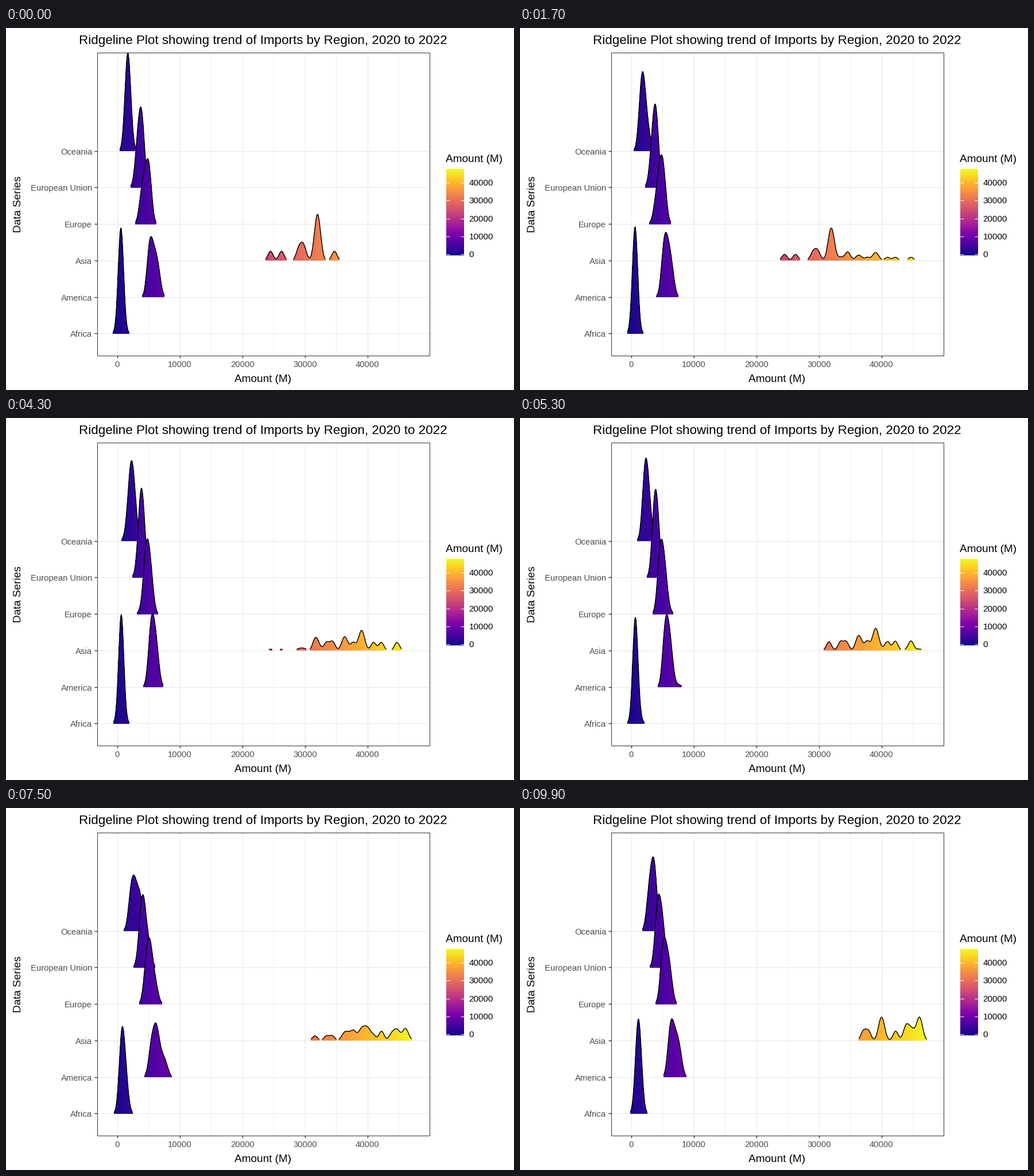
A matplotlib script for the animation above (10 s loop, 885 by 632 pixels).

```python
import numpy as np
import matplotlib.pyplot as plt
from matplotlib.animation import FuncAnimation
from matplotlib.collections import PolyCollection
from matplotlib.patches import Rectangle

W, H, DPI = 885, 632, 100
PX = 72 / DPI
FRAMES, MID = 100, 50
LEFT, RIGHT, TOP, BOTTOM = 159, 738, 43, 571.5
LOW, HIGH = -765, 47500      # range of the density grid and the colour scale
BASE, STEP = 533.4, 63.77    # lowest baseline, distance between ridges
BW, UNIT = 405, 16.2         # kernel width, pixel height of one month
CUT = 1.91                   # ridges lower than this are not drawn
THIN, LINE = 0.9, 1.4
GRID, TICK, GREY = "#EBEBEB", "#333333", "#4D4D4D"
CMAP = plt.get_cmap("plasma")

plt.rcParams["font.family"] = "Liberation Sans"


def cells(n):
    return (np.arange(n) + 0.5) / n


def run(dense, sparse):
    """Twelve months crowding at one end and thinning out to the other."""
    return dense + (sparse - dense) * cells(12) ** 1.5


def clusters(counts):
    """Groups of months spread evenly around centres given in thousands."""
    return np.concatenate([1000 * c + 900 * (cells(n) - 0.5)
                           for c, n in counts.items()])


# Monthly amounts of 2020, 2021 and 2022, lowest ridge first
DATA = {
    "Africa": [run(425, 860), run(565, 800), run(860, 1660)],
    "America": [run(4960, 6850), run(5240, 6560), run(6050, 8050)],
    "Asia": [
        clusters({24.5: 1, 26.25: 1, 28.95: 1, 29.7: 2, 32: 6, 34.7: 1}),
        clusters({31.6: 1, 33.45: 1, 34.35: 1, 36.35: 2, 37.7: 1, 39.05: 3,
                  40.95: 1, 42.2: 1, 44.7: 1}),
        clusters({37.1: 1, 37.9: 1, 40: 3, 42.25: 1, 44: 2, 44.9: 1,
                  46.05: 3})],
    "Europe": [run(5310, 3630), run(4400, 5700), run(4870, 6500)],
    "European Union": [run(4170, 2980), run(3560, 4460), run(4000, 5400)],
    "Oceania": [run(1440, 2140), run(2000, 3010), run(3935, 2555)],
}


def density(months, v):
    return UNIT * np.exp(-0.5 * ((v - months[:, None]) / BW) ** 2).sum(axis=0)


def to_x(v):
    return LEFT + (v + 3178) / 53091 * (RIGHT - LEFT)


fig = plt.figure(figsize=(W / DPI, H / DPI), dpi=DPI, facecolor="white")
ax = fig.add_axes([0, 0, 1, 1])
ax.axis("off")


def line(xs, ys, color, width, z):
    ax.plot(xs, ys, color=color, lw=width * PX, zorder=z,
            solid_capstyle="butt")


def label(x, y, text, size, color="black", ha="center", **kw):
    ax.text(x, y, text, fontsize=size * PX, color=color, ha=ha,
            va="baseline", **kw)


# Panel: grid, ticks, labels, border
for v in range(5000, 50000, 10000):
    line([to_x(v)] * 2, [TOP, BOTTOM], GRID, THIN, 0)
for v in range(0, 50000, 10000):
    x = to_x(v)
    line([x, x], [TOP, BOTTOM], GRID, LINE, 0)
    line([x, x], [BOTTOM, BOTTOM + 4.6], TICK, LINE, 0)
    label(x, 592.5, str(v), 14.7, GREY)
for i, name in enumerate(DATA):
    y = BASE - i * STEP
    line([LEFT, RIGHT], [y, y], GRID, LINE, 0)
    line([LEFT - 4.6, LEFT], [y, y], TICK, LINE, 0)
    label(150, y + 6, name, 14.75, GREY, "right")
ax.add_patch(Rectangle((LEFT, TOP), RIGHT - LEFT, BOTTOM - TOP, fill=False,
                       ec=TICK, lw=PX, zorder=30))

label(448, 28, "Ridgeline Plot showing trend of Imports by Region, "
      "2020 to 2022", 22.38)
label(448, 618, "Amount (M)", 19)
label(25.7, 307.5, "Data Series", 19, rotation=90, rotation_mode="anchor")

# Colour bar
X0, X1, Y0, Y1 = 767, 798, 246.5, 397.5
label(766, 234, "Amount (M)", 19, ha="left")
ax.imshow(np.linspace(1, 0, 256)[:, None], cmap=CMAP, aspect="auto",
          extent=(X0, X1, Y1, Y0), zorder=1)
for v in range(0, 50000, 10000):
    y = Y1 - (v - LOW) / (HIGH - LOW) * (Y1 - Y0)
    for x in (X0, X1 - 6):
        line([x, x + 6], [y, y], "white", 1, 2)
    label(806.5, y + 5.2, str(v), 15, ha="left")
ax.set_xlim(0, W)
ax.set_ylim(H, 0)

# Ridges, lower ones in front
grid = np.linspace(LOW, HIGH, 512)
gx = to_x(grid)
shades = CMAP((grid[:-1] - LOW) / (HIGH - LOW))
ridges = []
for i, years in enumerate(DATA.values()):
    z = 20 - 2 * i
    fill = PolyCollection([], antialiaseds=False, linewidths=0, zorder=z)
    ax.add_collection(fill, autolim=False)
    edge, = ax.plot([], [], color="black", lw=LINE * PX, zorder=z + 1,
                    solid_capstyle="butt", solid_joinstyle="round")
    heights = [density(m, grid) for m in years]
    ridges.append((BASE - i * STEP, heights, fill, edge))


def update(frame):
    year = np.interp(frame, [0, MID, FRAMES - 1], [0, 1, 2])
    k = min(int(year), 1)
    t = year - k
    for base, heights, fill, edge in ridges:
        h = (1 - t) * heights[k] + t * heights[k + 1]
        seen = h >= CUT
        top = base - h
        edge.set_data(gx, np.where(seen, top, np.nan))
        floor = np.full(len(gx) - 1, base)
        slices = np.stack([
            np.column_stack([gx[:-1], floor]),
            np.column_stack([gx[:-1], top[:-1]]),
            np.column_stack([gx[1:], top[1:]]),
            np.column_stack([gx[1:], floor])], axis=1)
        keep = seen[:-1] & seen[1:]
        fill.set_verts(slices[keep])
        fill.set_facecolor(shades[keep])
    return [a for r in ridges for a in r[2:]]


anim = FuncAnimation(fig, update, frames=FRAMES, interval=100, repeat=True,
                     repeat_delay=0, blit=False)
plt.show()
```
